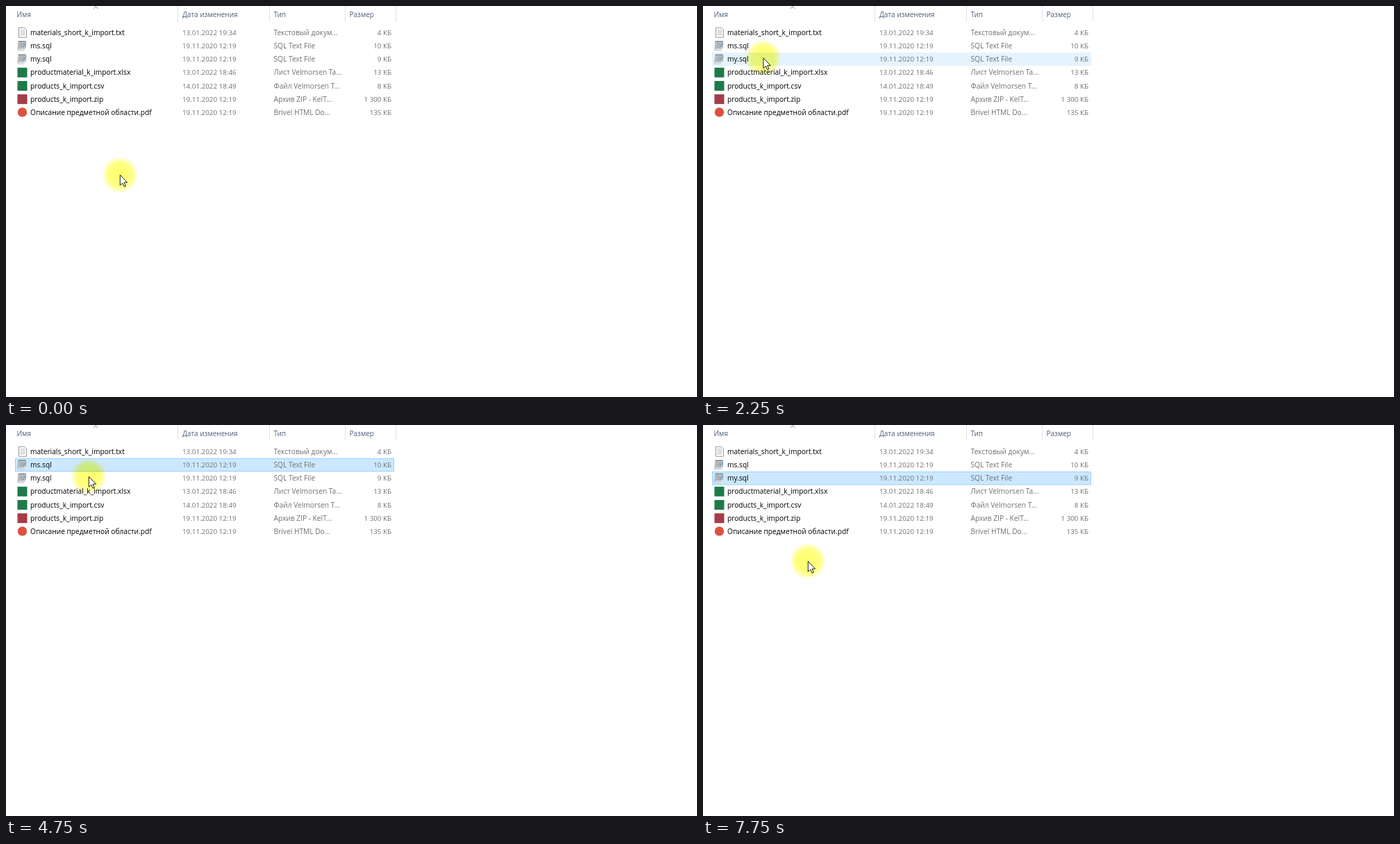
These frames come from a looping animation (995 px wide and 563 px high, 8 s). An HTML page:

```html
<!DOCTYPE html>
<html lang="ru">
<head>
<meta charset="utf-8">
<title>Список файлов</title>
<style>
html, body { margin: 0; width: 100%; height: 100%; overflow: hidden; background: #fff; }
svg { display: block; width: 995px; height: 563px; background: #fff; font: 10.2px "Open Sans", "Noto Sans", sans-serif; }
.header { fill: #4c607a; font-size: 10px; }
.info { fill: #707070; }
.number { font-size: 9.8px; }
.size { text-anchor: end; }
#glow { mix-blend-mode: multiply; }
</style>
</head>
<body>
<svg viewBox="0 0 995 563">
  <defs>
    <radialGradient id="halo">
      <stop offset="0" stop-color="#ffff70"/>
      <stop offset=".6" stop-color="#ffff7c"/>
      <stop offset=".82" stop-color="#ffffb0"/>
      <stop offset="1" stop-color="#fff"/>
    </radialGradient>
  </defs>
  <rect id="hover" x="13" width="546" height="19.2" fill="#e5f3ff"/>
  <rect id="selected" x="13.5" width="545" height="18.6" fill="#cce8ff" stroke="#99d1ff"/>
  <g id="list"></g>
  <circle id="glow" r="26" fill="url(#halo)"/>
  <path id="cursor" d="M.3 .3V15.2L3.8 12 6.1 17.2 8.3 16.2 6.1 11.1H10.6Z" fill="#fff" stroke="#111" stroke-width=".95"/>
</svg>
<script>
const ROW_TOP = 28.7, ROW_HEIGHT = 19.2, NONE = -1;
const $ = id => document.getElementById(id);

const files = [
  ['text', 'materials_short_k_import.txt', '13.01.2022 19:34', 'Текстовый докум...', '4 КБ'],
  ['script', 'ms.sql', '19.11.2020 12:19', 'SQL Text File', '10 КБ'],
  ['script', 'my.sql', '19.11.2020 12:19', 'SQL Text File', '9 КБ'],
  ['sheet', 'productmaterial_k_import.xlsx', '13.01.2022 18:46', 'Лист Velmorsen Ta...', '13 КБ'],
  ['sheet', 'products_k_import.csv', '14.01.2022 18:49', 'Файл Velmorsen T...', '8 КБ'],
  ['archive', 'products_k_import.zip', '19.11.2020 12:19', 'Архив ZIP - KelT...', '1 300 КБ'],
  ['browser', 'Описание предметной области.pdf', '19.11.2020 12:19', 'Brivel HTML Do...', '135 КБ']
];

// Icons are drawn around the middle of their row.
const icons = {
  text: `<path d="M18.5-7H26.5L29.5-4V7H18.5Z" fill="#fff" stroke="#8c8c8c" stroke-width=".9"/>
    <path d="M20.5-3.5H27.5M20.5-1.2H27.5M20.5 1.1H27.5M20.5 3.4H27.5" stroke="#a5a5a5" stroke-width=".8"/>`,
  script: `<path d="M18-6.5H28.5V3L26 6.5H16.8Z" fill="#c3c9cd" stroke="#8d979d" stroke-width=".7"/>
    <path d="M18.3-6.2H28.5" stroke="#59646b" stroke-width="1.5" stroke-dasharray="1 .7"/>
    <path d="M19.5-3H27M19.2-.7H27M19 1.6H25" stroke="#7c888f" stroke-width=".8"/>
    <path d="M17 5.7H26L28.5 3" stroke="#eef1f3" stroke-width="1.3" fill="none"/>
    <path d="M25 2L29-4" stroke="#729bbb" stroke-width="1.2"/>`,
  sheet: '<rect x="16.5" y="-7" width="14" height="14" fill="#1f7a49"/>',
  archive: '<rect x="16.5" y="-7" width="14" height="14" fill="#a63c48"/>',
  browser: '<circle cx="23.5" cy="-.5" r="6.7" fill="#dc5140"/>'
};

const label = (x, y, kind, text) => `<text x="${x}" y="${y}" class="${kind}">${text}</text>`;

const header = [[15.5, 'Имя'], [254, 'Дата изменения'], [385.5, 'Тип'], [494.5, 'Размер']]
  .map(([x, text]) => label(x, 15.6, 'header', text)).join('');
const rows = files.map(([icon, name, date, type, size], i) =>
  `<g transform="translate(0 ${38.2 + i * ROW_HEIGHT})">${icons[icon]}` +
  label(35, 3.6, '', name) + label(254, 3.6, 'info number', date) +
  label(385.5, 3.6, 'info', type) + label(555, 3.6, 'info number size', size) + '</g>').join('');
$('list').innerHTML = header + rows +
  `<path d="M247.5 0V23M379.5 0V23M488.5 0V23M561.5 0V23" stroke="#e2e2e2"/>
   <path d="M125.5 4L129 .7L132.5 4" fill="none" stroke="#777" stroke-width=".9"/>`;

// time, x, y
const path = [
  [0, 164, 243], [250, 150, 165], [380, 110, 62], [630, 82, 76], [750, 88, 58],
  [1000, 108, 55], [1250, 88, 74], [1380, 100, 69], [1750, 100, 56], [2000, 84, 72],
  [2380, 88, 76], [3000, 85, 74], [3380, 92, 56], [3750, 98, 68], [4000, 104, 64],
  [4380, 106, 60], [4750, 119, 74], [5000, 150, 171], [5250, 164, 214], [5380, 166, 219],
  [5750, 163, 217], [6000, 237, 263], [6250, 673, 283], [6380, 593, 210], [6630, 250, 110],
  [6750, 165, 62], [7000, 136, 69], [7380, 124, 76], [7630, 140, 140], [7750, 151, 196]
];

// time, selected row, hovered row
const states = [
  [0, NONE, NONE], [380, NONE, 1], [630, NONE, 2], [750, NONE, 1], [1250, NONE, 2],
  [1380, NONE, 1], [2000, NONE, 2], [2630, 2, NONE], [3250, 2, 1], [3630, 1, NONE],
  [3750, 1, 2], [4000, 1, NONE], [5000, 1, 6], [5250, 1, NONE], [6630, 1, 5],
  [6750, 1, NONE], [7000, 1, 2], [7250, 2, NONE], [7630, 2, 6], [7750, 2, NONE]
];

// The screen refreshes five times a second, unevenly.
function refreshTime(t) {
  const second = Math.floor(t / 1000) * 1000;
  return second + [750, 630, 380, 250, 0].find(step => step <= t - second);
}

function pointerAt(t) {
  const i = path.findLastIndex(([time]) => time <= t);
  const [t0, x0, y0] = path[i], [t1, x1, y1] = path[i + 1] || [8000, x0, y0];
  const k = (t - t0) / (t1 - t0);
  return [x0 + (x1 - x0) * k, y0 + (y1 - y0) * k];
}

function mark(id, row, inset) {
  $(id).setAttribute('visibility', row === NONE ? 'hidden' : 'visible');
  $(id).setAttribute('y', ROW_TOP + row * ROW_HEIGHT + inset);
}

function draw(now) {
  const t = refreshTime(now % 8000);
  const [, selected, hovered] = states.findLast(([time]) => time <= t);
  mark('selected', selected, .3);
  mark('hover', hovered, 0);
  const place = `translate(${pointerAt(t)})`;
  $('glow').setAttribute('transform', place);
  $('cursor').setAttribute('transform', place);
}

const start = performance.now();
function tick() {
  draw(performance.now() - start);
  requestAnimationFrame(tick);
}
tick();
</script>
</body>
</html>
```
